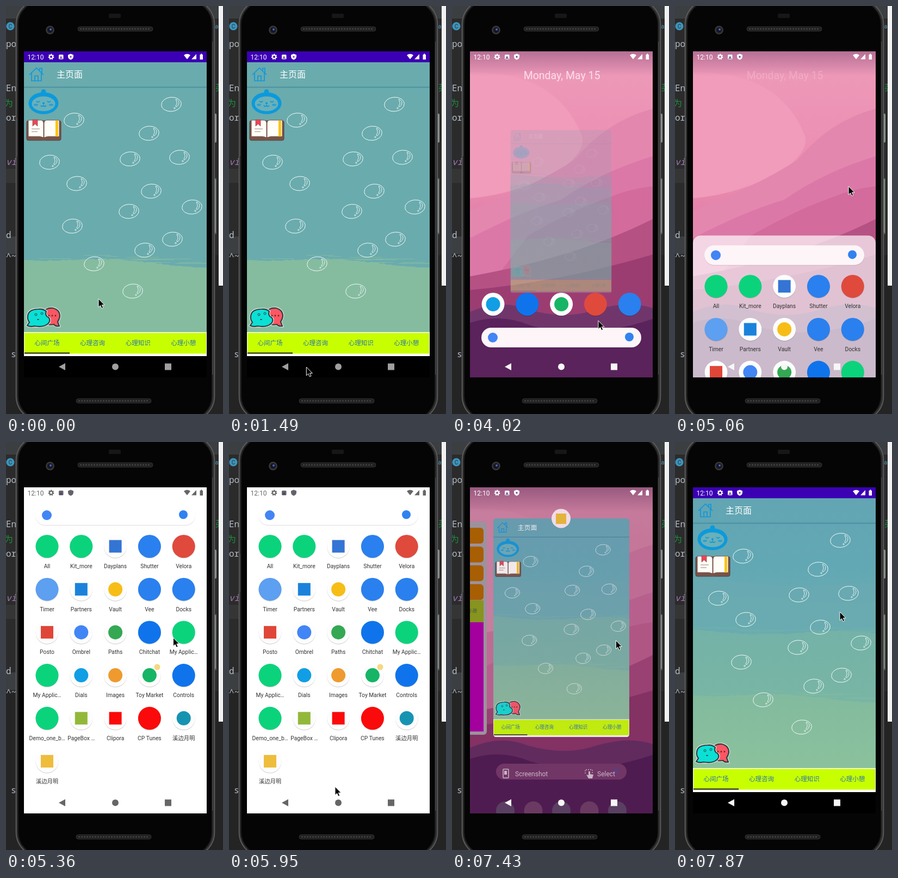
Write an HTML page with a canvas that moves like this. It is 399 px wide and 747 px high and loops after 8 s.

```html
<!DOCTYPE html>
<html lang="zh">
<head>
<meta charset="utf-8">
<style>
html, body { margin: 0; width: 100%; height: 100%; overflow: hidden; background: #2b2b2b; }
canvas { display: block; }
</style>
</head>
<body>
<canvas id="stage" width="399" height="747"></canvas>
<script>
const g = document.getElementById('stage').getContext('2d');
const SANS = 'Roboto, "Noto Sans CJK SC", sans-serif';
const MONO = '"Noto Sans Mono", "Noto Sans CJK SC", monospace';
const LOOP = 8000, STEP = 148.33;

// Linear interpolation through rows of [time, value, ...]
function track(t, keys) {
  const i = keys.findIndex(k => k[0] > t);
  if (i < 0) return keys[keys.length - 1].slice(1);
  if (i === 0) return keys[0].slice(1);
  const a = keys[i - 1], b = keys[i], u = (t - a[0]) / (b[0] - a[0]);
  return a.slice(1).map((v, j) => v + (b[j + 1] - v) * u);
}
const ramp = (t, a, b) => Math.max(0, Math.min(1, (t - a) / (b - a)));
const mix = (a, b, u) => a + (b - a) * u;
const easeOut = u => 1 - (1 - u) * (1 - u);
const rand = n => { const v = Math.sin(n * 127.1 + 3.7) * 43758.5; return v - Math.floor(v); };

function rect(x, y, w, h, fill) { g.fillStyle = fill; g.fillRect(x, y, w, h); }
function round(x, y, w, h, r, fill, line, width = 1) {
  g.beginPath(); g.roundRect(x, y, w, h, r); paint(fill, line, width);
}
function oval(x, y, rx, ry, fill, line, width = 1, tilt = 0) {
  g.beginPath(); g.ellipse(x, y, rx, ry, tilt, 0, 7); paint(fill, line, width);
}
const disc = (x, y, r, fill, line, width) => oval(x, y, r, r, fill, line, width);
function shape(d, fill, line, width = 1) {
  const p = new Path2D(d);
  if (fill) { g.fillStyle = fill; g.fill(p); }
  if (line) { g.strokeStyle = line; g.lineWidth = width; g.stroke(p); }
}
function paint(fill, line, width) {
  if (fill) { g.fillStyle = fill; g.fill(); }
  if (line) { g.strokeStyle = line; g.lineWidth = width; g.stroke(); }
}
function text(s, x, y, size, fill, align = 'left', family = SANS, style = '') {
  g.font = `${style} ${size}px ${family}`;
  g.textAlign = align; g.fillStyle = fill; g.fillText(s, x, y);
}
function layer(alpha, draw) {
  if (alpha <= 0) return;
  g.save(); g.globalAlpha *= Math.min(1, alpha); draw(); g.restore();
}
function vertical(y0, y1, ...colors) {
  const f = g.createLinearGradient(0, y0, 0, y1);
  colors.forEach((c, i) => f.addColorStop(i / (colors.length - 1), c));
  return f;
}

function drawDesk() {
  rect(0, 0, 399, 747, '#2b2b2b');
  rect(0, 0, 399, 23, '#3c3f41');
  rect(0, 298, 20, 26, '#353535');
  rect(0, 422, 20, 32, '#3c3f41');
  rect(0, 456, 399, 291, '#242425');
  disc(8, 37, 7.5, '#3d94bb');
  text('C', 8, 41, 10, '#20323b', 'center');
  const code = [['po', 75], ['En', 156], ['or', 210], ['d', 425], ['^~', 464]];
  for (const [s, y] of code) text(s, 0, y, 16, '#b4bcc6', 'left', MONO);
  text('为', -3, 184, 16, '#1f8b3c', 'left', MONO);
  text('vi', 0, 291, 16, '#a57bb5', 'left', MONO, 'italic');
  text('s', 9, 643, 16, '#b4bcc6', 'left', MONO);
  text('cla', 376, 41, 11, '#4a9cc4');
  text('英', 385, 155, 15, '#1f8b3c', 'left', MONO);
  rect(391, 0, 8, 512, '#f1f1f1');
}

function drawDevice() {
  round(380, 197, 7, 53, 2, '#8d948f');
  round(380, 315, 7, 103, 2, '#555a57');
  rect(384, 317, 1.5, 98, '#9da39f');
  round(18.5, -12, 365, 772, 46, '#343434', '#626262', 1.5);
  round(22, -9, 357, 766, 43, '#050505', '#1b1b1b', 2);
  rect(18, 205, 3, 70, '#4d4d4d');
  rect(379, 65, 2, 610, '#3f3f3f');
  round(189, 14, 22, 8, 2, '#17171a');
  for (const [x, y] of [[132, 38], [129, 719]]) {
    round(x, y, 138, 8, 4, '#202020', '#333');
    g.setLineDash([3, 2]);
    shape(`M${x + 4} ${y + 4}h130`, null, '#474747', 2);
    g.setLineDash([]);
  }
  disc(81, 44, 7, '#252527', '#424242', 1.5);
  disc(81, 44, 4, '#101426');
  disc(82, 43, 2, '#4b61b5');
}

// Everything below a wavy brushed edge
function band(y, tilt, fill, seed) {
  const edge = x => y + tilt * (x - 33) / 336 + 4 * Math.sin((x - 20) / 48 + seed);
  g.beginPath(); g.moveTo(33, 597);
  for (let x = 33; x <= 369; x += 6) g.lineTo(x, edge(x) + rand(x + seed) * 2);
  g.lineTo(369, 597); g.fillStyle = fill; g.fill();
  for (let i = 0; i < 18; i++) {
    const x = 33 + rand(i + seed * 9) * 300, w = 15 + rand(i * 3 + seed) * 70;
    rect(x, edge(x) - 7 + rand(i * 5 + seed) * 9, Math.min(w, 369 - x), .8, fill);
  }
}

const bubbles = [[125,209],[304,180],[263,233],[228,280],[319,277],[80,286],[130,325],
  [267,339],[226,376],[342,368],[122,403],[306,427],[255,447],[162,472],[233,522]];

function drawBubble([x, y]) {
  oval(x, y, 18.3, 13, null, '#f2fbf8', 1, -.08);
  g.save(); g.translate(x, y);
  shape('M8-9Q14-8 14-3Q14 2 9 5L8 3Q11-1 10-4Q9-7 8-9Z', null, '#f2fbf8', .9);
  disc(6, 7, 1.2, null, '#f2fbf8', .8);
  g.restore();
}

function drawHouse() {
  shape('M43 126L56 113.5L69 126M47 123V137H65V123M53 137V128H59V137M62 118V114H66V123', null, '#1296db', 1.7);
}

function drawFace() {
  oval(69, 178, 27.5, 20, '#0c9adb');
  disc(69, 157, 4.5, '#0c9adb');
  oval(69, 179, 21.5, 13.5, '#6ab0b9');
  shape('M56 174q3 4 6 0M76 174q3 4 6 0M64 182q2.500 4 5 0q2.500 4 5 0', null, '#0c9adb', 1.8);
  oval(55, 181, 4, 2, '#2aa0d4'); oval(83, 181, 4, 2, '#2aa0d4');
  disc(69, 178, 2, '#0c9adb');
}

function drawBook() {
  round(38, 210, 63, 36, 3, '#765349', '#5a3d36');
  shape('M41 209H65Q69 210 69 214V242Q66 239 62 239H41Z', '#fffdf8', '#765349');
  shape('M98 209H74Q70 210 70 214V242Q73 239 77 239H98Z', '#fffdf8', '#765349');
  rect(91, 210, 5, 29, '#fac416');
  shape('M49 208H58V220L53.500 216L49 220Z', '#ef4458', '#765349', .7);
  shape('M47 225h15M47 230h11', null, '#9c8379', 1.2);
  round(65, 240, 9, 6, 2, '#765349');
}

function drawChat() {
  const red = 'M68 562Q73 552 86 553Q99 556 99 568Q98 574 95 578L98 586Q91 587 88 583Q75 586 69 577Z';
  const blue = 'M40 568Q41 555 60 555Q68 554 74 559Q71 567 78 570Q83 575 78 581Q70 589 52 586Q45 588 39 585L43 579Q39 574 40 568Z';
  for (const [d, fill] of [[red, '#fb5763'], [blue, '#0be0d5']]) {
    shape(d, null, '#d9e9df', 4.5);
    shape(d, fill, '#303b40', 2.2);
  }
  disc(55, 565, 2, null, '#20464b'); disc(66, 563, 2, null, '#20464b');
  oval(59, 574, 2, 1, '#20464b');
  for (const x of [79, 85, 91]) disc(x, 567, 1.4, '#64282d');
}

// Contents of the app below the status bar
function drawApp(flat) {
  if (flat) {
    rect(33, 103, 336, 538, '#6aabae');
    band(460, 14, '#85bca0', 1);
  } else {
    rect(33, 103, 336, 538, vertical(103, 350, '#63a5b3', '#62a8b4', '#6aadaf'));
    band(254, 8, '#68a9b2', 4);
    band(283, 8, '#69abb0', 2);
    band(346, 4, vertical(340, 460, '#74b2a8', '#78b5a5'), 5);
    band(459, 13, vertical(460, 597, '#82ba9f', '#8bc19c'), 1);
  }
  rect(33, 147.500, 336, 2.500, 'rgba(35,105,140,.32)');
  text('主页面', 93, 131, 16, '#fff');
  drawHouse(); drawFace(); drawBook(); drawChat();
  bubbles.forEach(drawBubble);
  rect(33, 597, 336, 44, '#fff');
  rect(34, 598.500, 334, 38, '#c8ff00');
  ['心间广场', '心理咨询', '心理知识', '心理小憩'].forEach((s, i) =>
    text(s, 75.5 + i * 83.6, 621, 11.500, '#2878a8', 'center'));
  rect(34, 634.500, 83, 2, '#1a1a1a');
}

function drawWallpaper() {
  rect(33, 83, 336, 597, vertical(83, 550, '#ee9bb9', '#eb8cb1', '#cf6791'));
  shape('M33 122Q190 118 238 235Q250 262 200 300Q120 345 33 352Z', '#f09cba');
  shape('M33 375Q150 330 225 282Q285 210 369 188V560H33Z', '#e487af');
  shape('M33 425Q130 375 200 355Q275 303 369 275V560H33Z', '#dc78a7');
  shape('M140 420Q230 370 290 350Q325 335 369 330V560H33Z', '#d36b9c');
  shape('M33 495Q230 460 369 390V560H33Z', '#b65184');
  shape('M33 560V520Q200 505 369 455V570H33Z', '#9c3d72');
  shape('M33 560Q90 535 140 556Q210 575 265 556Q325 538 369 553V680H33Z', '#70366c');
  shape('M33 580Q90 562 145 585Q240 615 369 573V680H33Z', '#5a235b');
  rect(33, 83, 336, 45, vertical(83, 128, 'rgba(90,40,90,.38)', 'rgba(90,40,90,0)'));
}

const GREEN = '#0bd37c', BLUE = '#2a80ee';
// Label, colour, then "o" or "s" for a small disc or square on a white tile
const apps = [
  ['All', GREEN], ['Kit_more', GREEN], ['Dayplans', '#3474d4', 's'], ['Shutter', BLUE], ['Velora', '#df4a3d'],
  ['Timer', '#5d9ff0'], ['Partners', '#1b82dc', 's'], ['Vault', '#f7bd17', 'o'], ['Vee', BLUE], ['Docks', BLUE],
  ['Posto', '#df4638', 's'], ['Ombrel', '#4285f4', 'o'], ['Paths', '#34a853', 'o'], ['Chitchat', '#0f74ec'], ['My Applic…', GREEN],
  ['My Applic…', GREEN], ['Dials', '#119ee5', 'o'], ['Images', '#ee9a2e', 'o'], ['Toy Market', '#16b565', 'o'], ['Controls', '#0f74ec'],
  ['Demo_one_b…', GREEN], ['PageBox …', '#92b83a', 's'], ['Clipora', '#fa0a0a', 's'], ['CP Tunes', '#fa0a0a'], ['溪边月明', '#1793b2', 'o'],
  ['溪边月明', '#efbd3c', 's']
];
const column = i => 75.5 + (i % 5) * 62.8;

function drawIcon([, color, mark], x, y) {
  disc(x, y + 1, 21, 'rgba(0,0,0,.2)');
  disc(x, y, 21, mark ? '#fdfdfd' : color);
  if (mark === 'o') disc(x, y, 13, color);
  if (mark === 's') rect(x - 11.500, y - 11.500, 23, 23, color);
}

function drawDrawer(p) {
  const d = 473 * (1 - p);
  layer(p * 2.150 + (p > .9 ? 1 : 0), () => {
    g.beginPath(); g.roundRect(33, 98 + d - 25 * ramp(p, .6, 1), 336, 700, 14 * (1 - ramp(p, .8, 1)));
    g.fillStyle = '#fff'; g.fill();
  });
  round(54, 117 + d, 294, 36, 18, 'rgba(90,60,80,.18)');
  round(54, 116 + d, 294, 36, 18, p > .9 ? '#fff' : '#fdf5f8');
  disc(75, 134 + d, 9, '#4285f4');
  disc(326, 133 + d, 8, '#3182f0');
  layer(p * 4, () => apps.forEach((a, i) => {
    const x = column(i), y = 191 + d + Math.floor(i / 5) * 78.7;
    drawIcon(a, x, y);
    if (i === 18) disc(278, 412 + d, 5.5, '#f5d882');
    text(a[0], x, y + 40, 10.3, '#333', 'center');
  }));
  layer(1 - p * 4, () => [16, 13, 18, 4, 3].forEach((n, i) => drawIcon(apps[n], column(i), 546 + d - 473)));
}

function drawSideCard() {
  round(-60, 146, 124, 390, 6, '#9c929d');
  for (let i = 0; i < 4; i++) round(-40, 157 + i * 34.4, 98, 29, 6, '#a85e02');
  rect(-40, 290, 98, 40, '#87941d');
  text('心理小憩', 46, 312, 8, '#455747', 'right');
  rect(-40, 330, 98, 200, '#a3009e');
}

function drawActions() {
  round(81, 589, 240, 29, 14.500, '#713666');
  disc(302, 603, 5, 'rgba(80,70,150,.5)');
  round(94, 599, 10, 16, 1, null, '#c9b4c5', 1.5);
  rect(96, 602, 5, 7, '#c9b4c5');
  text('Screenshot', 116, 612, 12, '#cbb6c7');
  g.setLineDash([2, 2]);
  shape('M245 607V600H258V606', null, '#c9b4c5', 1.300);
  g.setLineDash([]);
  shape('M251 603V610L247 609L251 616H258L260 609L254 608V603Z', '#c9b4c5');
  text('Select', 267, 612, 12, '#cbb6c7');
  for (let i = 0; i < 5; i++) disc(98 + i * 51.5, 675, 17, i % 2 ? '#6b3a62' : '#5a3f62');
}

// App window with a free corner and scale
function drawWindow(x, y, scale, flat, tint) {
  g.save();
  g.translate(x, y); g.scale(scale, scale); g.translate(-33, -103);
  g.beginPath(); g.roundRect(33, 103, 336, 538, scale < 1 ? 7 : 0); g.clip();
  drawApp(flat);
  if (tint > 0) rect(33, 103, 336, 538, `rgba(130,80,130,${.12 * tint})`);
  g.restore();
}

function drawStatus(ink) {
  text('12:10', 39.500, 97.500, 12, ink);
  g.setLineDash([2, 1.900]);
  disc(83, 93, 4.400, null, ink, 2);
  g.setLineDash([]);
  disc(83, 93, 3, null, ink, 2);
  round(97, 89, 8.500, 8.500, 1.5, ink);
  text('A', 101.2, 96.500, 8, '#4b2f86', 'center', SANS, 'bold');
  shape('M119 87.500L124 89.500V93Q123.500 97 119 98.500Q114.500 97 114 93V89.500Z', ink);
  disc(119, 93, 1.700, '#6b4a9b');
  shape('M327 90Q333 85.500 339 90L333 97.500Z', ink);
  shape('M350 88V97.500H341Z', ink);
  shape('M356.500 89H358V87.500H360.500V89H362V98H356.500Z', ink);
}

function drawNav(ink) {
  shape('M97 660.500L109 654V667Z', ink);
  disc(201, 660.500, 6, ink);
  rect(292, 654.500, 12, 12, ink);
}

const cursorPath = [[700,170,536],[1050,128,630],[1200,104,662],[1350,116,676],[1491,142,661],
  [1640,205,663],[1788,269,660],[2085,282,666],[2300,282,666],[2960,197,662],[3260,195,662],[3640,195,662],
  [4170,300,540],[4460,325,480],[4830,325,480],[5051,319,330],[5300,319,330],[5790,202,618],
  [5940,195,631],[6060,195,631],[6400,292,653],[7230,292,653],[7460,303,311]];

function drawCursor(t) {
  const [x, y] = track(t, cursorPath);
  g.save(); g.translate(x, y);
  shape('M0 0V15.500L3.600 12.300L6 17.700L8.700 16.500L6.300 11.300H11Z', '#000', '#fff', 1);
  g.restore();
}

function render(t) {
  const flat = t < 2500;
  const leave = ramp(t, 3600, 4100);
  const [drawer] = track(t, [[4850, 0], [5051.7, .319], [5320, 1], [6420, 1], [6780, 0]]);
  const overview = easeOut(ramp(t, 6480, 6800));
  const enter = easeOut(ramp(t, 7460, 7860));
  const home = leave > 0 && enter < 1;
  const inApp = leave === 0 ? 1 : Math.max(1 - leave * 2, enter);

  drawDesk();
  drawDevice();
  g.save();
  g.beginPath(); g.rect(33, 83, 336, 597); g.clip();
  if (home) {
    drawWallpaper();
    layer(overview > 0 ? 0 : 1 - drawer * 2.2, () =>
      text('Monday, May 15', 202, 134, 19.500, 'rgba(255,235,243,.85)', 'center'));
    layer(1 - overview, () => drawDrawer(drawer));
    layer(overview, () => {
      rect(33, 83, 336, 597, 'rgba(35,0,40,.2)');
      g.save(); g.translate(-60 * (1 - overview) - 40 * enter, 0); drawSideCard(); g.restore();
      layer(1 - enter, drawActions);
      drawWindow(mix(76, 33, enter), mix(140, 103, enter) + 60 * (1 - overview), mix(.744, 1, enter), false, 1 - enter);
      layer(1 - enter * 2, () => {
        disc(200.5, 140, 17.5, '#f0dce7');
        rect(191, 131, 19, 19, '#e3b33c');
      });
    });
    if (enter === 0) layer(1 - leave, () =>
      drawWindow(33 + 90 * leave, 103 + 150 * leave, 1 - .54 * leave, false, 0));
  } else {
    drawWindow(33, 103, 1, flat, 0);
  }
  layer(inApp, () => {
    rect(33, 83, 336, 20, '#3b00b3');
    rect(33, 641, 336, 39, '#000');
  });
  const press = ramp(t, 3330, 3500) * (1 - ramp(t, 3620, 3950));
  layer(press, () => round(157, 641, 88, 39, 20, '#2b2b2b'));
  const recent = ramp(t, 6400, 6520) * (1 - ramp(t, 6600, 7130));
  layer(recent, () => round(254, 641, 88, 39, 20, 'rgba(35,10,35,.4)'));
  const white = drawer > .9;
  drawStatus(white ? '#666' : '#fff');
  drawNav(white ? '#666' : flat ? '#a0a0a0' : '#f7f7f7');
  g.restore();
  drawCursor(t);
}

function frame(now) {
  const t = now % LOOP;
  const k = Math.floor((t - 740) / STEP);
  render(k < 0 ? 0 : 750 + k * STEP);
  requestAnimationFrame(frame);
}
requestAnimationFrame(frame);
</script>
</body>
</html>
```
